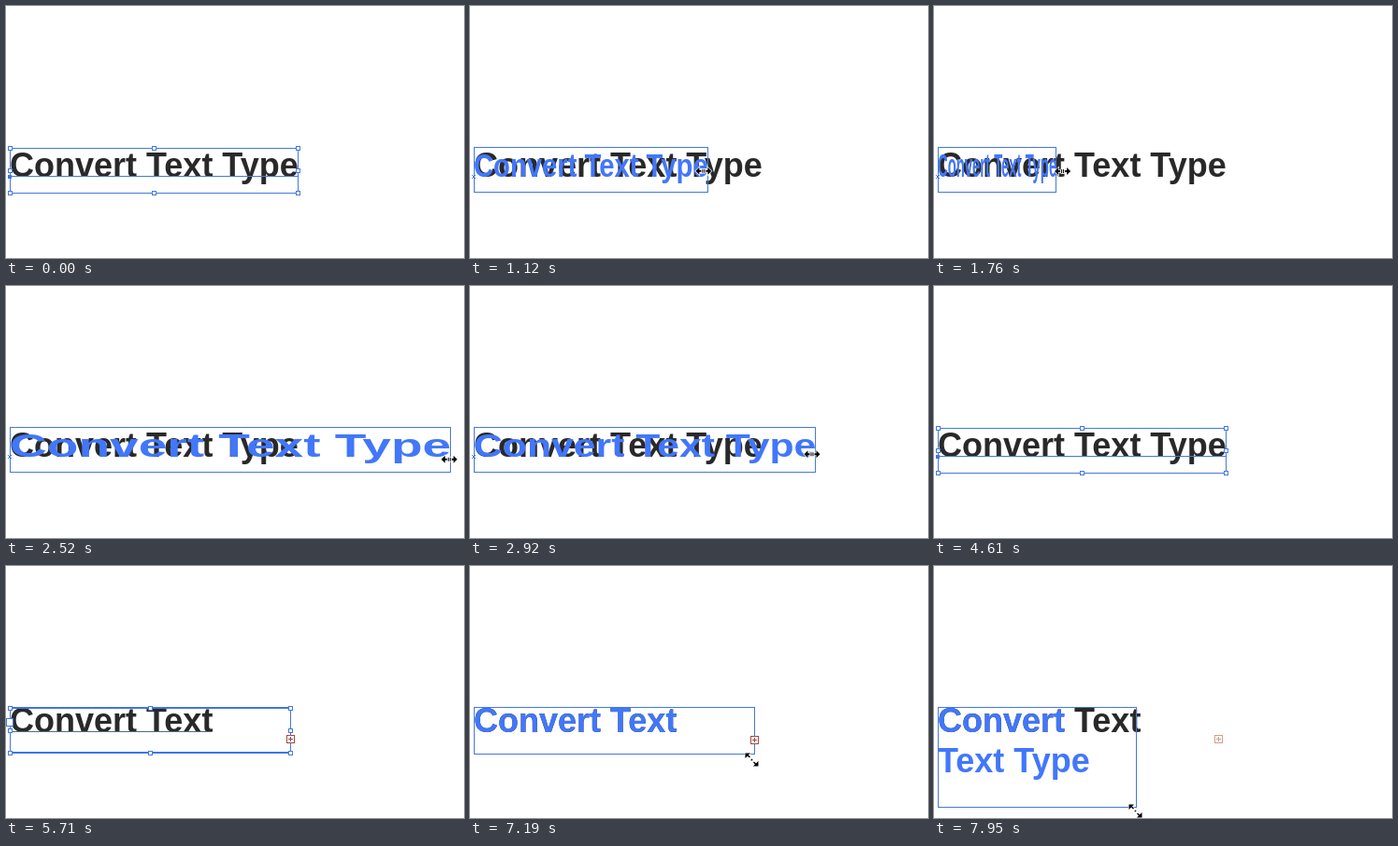
Write an HTML page that moves like this. It is 490 by 270 pixels and loops after 7.99 s.

```html
<!DOCTYPE html>
<html lang="en">
<head>
<meta charset="utf-8">
<title>Convert Text Type</title>
<style>
  html, body { margin: 0; width: 100%; height: 100%; overflow: hidden; background: #fff; }
  svg { display: block; width: 490px; height: 270px; }
  text { font: bold 36px "Liberation Sans", Arial, sans-serif; fill: #292929; white-space: pre; }
  .live text { fill: #4277fa; }
  .line, .handle { fill: none; stroke: #4479dc; shape-rendering: crispEdges; }
  .handle { fill: #fff; }
  .thick { stroke: #3f75e6; stroke-width: 2; }
  .overset { fill: #fff; stroke: #a2473f; shape-rendering: crispEdges; }
  .overset.pale { stroke: #d99a8e; }
  #cursor path { stroke: #fff; stroke-width: 1.4; paint-order: stroke; }
</style>
</head>
<body>
<svg viewBox="0 0 490 270">
  <g id="pointText"><text x="4" y="183">Convert Text Type</text></g>
  <g id="areaText"><text x="4" y="178">Convert Text</text></g>

  <g id="pointSelection">
    <path class="line" d="M4.5 152.5H312.5V200.5H4.5ZM4 182.5H312"/>
    <rect x="2" y="181" width="4" height="4" fill="#3f75e6"/>
  </g>

  <g id="areaSelection">
    <path class="line" d="M4.5 152V200M304.5 152V200"/>
    <path class="line thick" d="M4 152H304M4 200H304"/>
    <path class="line" d="M4 177.5H220" style="stroke:#4c6f78"/>
    <rect class="handle" x="0.5" y="163.5" width="7" height="8"/>
  </g>

  <g id="scaling" class="live">
    <g id="scaledText"><text y="183">Convert Text Type</text></g>
    <path class="line" d="M2 181l4 4m0-4l-4 4" style="shape-rendering:auto"/>
  </g>

  <g id="reflow" class="live">
    <text id="line1" x="4" y="178"></text>
    <text id="line2" x="4" y="221"></text>
  </g>

  <rect id="frame" class="line" x="4.5" y="151.5"/>
  <path id="overset" class="overset" d="M300.5 181.5h8v8h-8ZM302 185.5h5M304.5 183v5"/>
  <g id="cursor">
    <path id="sideArrows" d="M-8.5 0l4-4v3h2v2h-2v3ZM8.5 0l-4-4v3h-2v2h2v3ZM-1.5-2h1v4h-1ZM.5-2h1v4h-1Z"/>
    <path id="cornerArrows" d="M-7-7h5.5l-2 2l2 2l-1 1l-2-2l-2.5 2.5ZM7 7h-5.5l2-2l-2-2l1-1l2 2l2.5-2.5ZM-.8-.8h1.6v1.6h-1.6Z"/>
  </g>
</svg>
<script>
const LOOP = 7990;
const $ = id => document.getElementById(id);
const show = (id, on) => { $(id).style.display = on ? '' : 'none'; };
const within = (t, a, b) => t >= a && t < b;

// Eased progress of t through the span a..b
const ease = (t, a, b) => {
  const p = Math.min(1, Math.max(0, (t - a) / (b - a)));
  return p * p * (3 - 2 * p);
};
const mix = (a, b, p) => a + (b - a) * p;

// Keys are [time, value] pairs
function track(keys, t) {
  let value = keys[0][1];
  for (let i = 1; i < keys.length; i++) {
    const [start, from] = keys[i - 1], [end, to] = keys[i];
    if (t >= start) value = mix(from, to, ease(t, start, end));
  }
  return value;
}

const edgeKeys = [[840, 312], [1640, 108], [2440, 480], [3240, 310]];
const dragYKeys = [[840, 177], [1640, 176.5], [2440, 186], [3240, 177]];

function addHandles(group, right) {
  const middle = (4 + right) / 2;
  for (const y of [152, 176, 200]) {
    for (const x of y === 176 ? [4, right] : [4, middle, right]) {
      const handle = document.createElementNS('http://www.w3.org/2000/svg', 'rect');
      const attrs = { class: 'handle', x: x - 1.5, y: y - 1.5, width: 4, height: 4 };
      for (const name in attrs) handle.setAttribute(name, attrs[name]);
      $(group).append(handle);
    }
  }
}

function setFrame(right, bottom) {
  $('frame').setAttribute('width', Math.floor(right) - 4);
  $('frame').setAttribute('height', Math.floor(bottom) - 151);
}

function cursorAt(t) {
  if (within(t, 80, 880)) {
    const p = ease(t, 40, 840);
    return { x: mix(477, 313, p), y: mix(82, 177, p) };
  }
  if (within(t, 880, 3360)) {
    return { x: track(edgeKeys, t + 15) + 1, y: track(dragYKeys, t) };
  }
  if (within(t, 3360, 3760)) {
    const p = ease(t, 3320, 3760);
    return { x: mix(311, 302, p), y: mix(177, 132, p), alpha: 1 - p };
  }
  if (within(t, 6310, 7110)) {
    const p = ease(t, 6270, 7070);
    return { x: mix(376, 304, p), y: mix(253, 206, p), corner: true };
  }
  if (t >= 7110) {
    const p = ease(t, 7110, 7910);
    return { x: mix(304, 215.5, p), y: mix(206, 262.5, p), corner: true };
  }
  return null;
}

function render(t) {
  const scaling = within(t, 880, 3360);
  const area = t >= 5150;
  const reflow = t >= 7110;

  show('pointText', !area);
  show('areaText', area);
  show('pointSelection', !area && !scaling);
  show('areaSelection', area && !reflow);
  show('scaling', scaling);
  show('reflow', reflow);
  show('frame', scaling || reflow);
  show('overset', area);

  if (scaling) {
    const edge = track(edgeKeys, t);
    $('scaledText').setAttribute('transform', `translate(4) scale(${(edge - 4) / 308} 1)`);
    setFrame(edge, 199);
  }
  if (reflow) {
    const right = mix(304.5, 216, ease(t, 7170, 7910));
    const bottom = mix(200, 258, ease(t, 7110, 7910));
    const narrow = right < 222, tall = bottom > 229;
    $('line1').textContent = narrow ? 'Convert' : 'Convert Text';
    $('line2').textContent = !tall ? '' : narrow ? 'Text Type' : 'Type';
    setFrame(right, bottom);
  }
  $('overset').classList.toggle('pale', t >= 7950);
  $('overset').setAttribute('transform', `translate(0 ${within(t, 7110, 7950) ? 1 : 0})`);

  const cursor = cursorAt(t);
  show('cursor', cursor);
  if (cursor) {
    const { x, y, corner = false, alpha = 1 } = cursor;
    show('sideArrows', !corner);
    show('cornerArrows', corner);
    $('cursor').setAttribute('transform', `translate(${x} ${y})`);
    $('cursor').setAttribute('opacity', alpha);
  }
}

addHandles('pointSelection', 312);
addHandles('areaSelection', 304);

const start = performance.now();
function tick() {
  render((performance.now() - start) % LOOP);
  requestAnimationFrame(tick);
}
tick();
</script>
</body>
</html>
```
